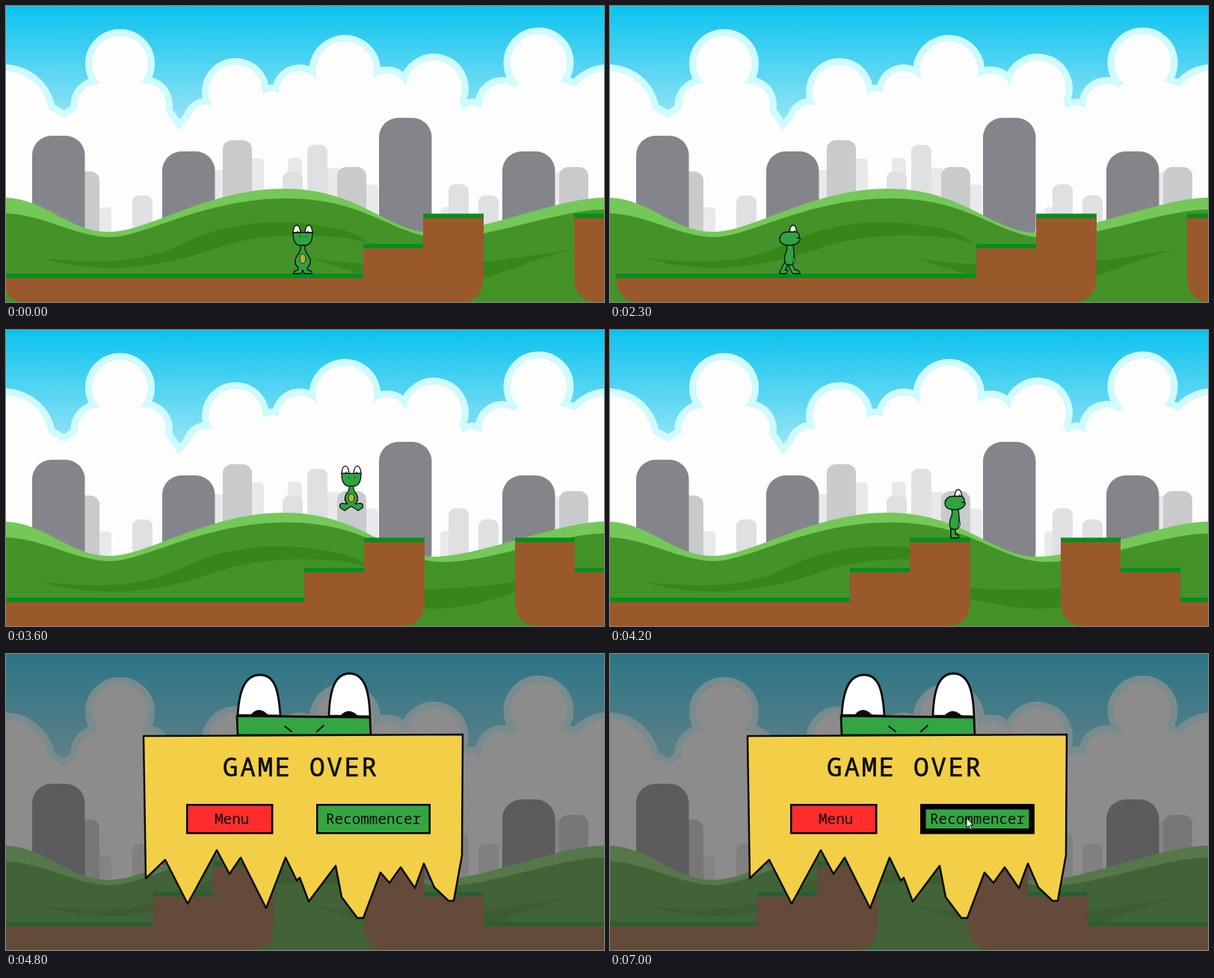
An HTML page that plays this animation: 800 px wide and 397 px high, repeating every 7.1 s.

```html
<!DOCTYPE html>
<html lang="fr">
<head>
<meta charset="utf-8">
<title>Frog platformer</title>
<style>
html, body { margin: 0; height: 100%; overflow: hidden; }
svg { display: block; width: 100%; height: 100%; }
text { font-family: "Noto Sans Mono", monospace; white-space: pre; }
.ink { stroke: #0b0b0b; stroke-linejoin: round; stroke-linecap: round; }
</style>
</head>
<body>
<svg viewBox="0 0 800 397" preserveAspectRatio="none">
  <defs>
    <linearGradient id="sky" x2="0" y2="1">
      <stop stop-color="#0bc3ee"/><stop offset="1" stop-color="#a5e8f6"/>
    </linearGradient>
    <g id="face">
      <path fill="#fff" d="M-13 -55Q-12 -65 -8 -65T-3 -55zM13 -55Q12 -65 8 -65T3 -55z"/>
      <path d="M-7 -57v2M7 -57v2"/>
      <path d="M-13 -55H13Q13 -39 4 -38H-4Q-13 -39 -13 -55z"/>
      <path d="M-3.500 -50v.4M4.500 -50v.4"/>
    </g>
    <path id="leg" d="M-3 -18L-3 -4Q-4 0 0 0H7Q9 -5 3 -5L3 -18z"/>
  </defs>

  <rect width="800" height="170" fill="url(#sky)"/>
  <path fill="#fdfdfe" stroke="#cffaff" stroke-width="18" paint-order="stroke" d="M-20 330V90
    A60 60 0 0 1 57 138L78 150L96 138A29 29 0 0 1 126 104A37.500 37.500 0 1 1 179 104A29 29 0 0 1 213 140
    L231 167L246 150A24 24 0 0 1 276 133A36 36 0 1 1 343 118A28 28 0 0 1 365 116A28 28 0 0 1 417 101
    A39 39 0 1 1 491 97A28 28 0 0 1 535 107A37.500 37.500 0 1 1 606 127L611 138A20 20 0 0 1 637 138
    A28 28 0 0 1 680 109L687 104A38 38 0 1 1 741 101L762 108A60 60 0 0 1 820 88V330z"/>
  <g id="city"></g>
  <path fill="#74c858" d="M0 257C55 260 85 303 138 303S270 245 372 245S510 304 572 304S740 257 800 257V397H0z"/>
  <path fill="#439328" d="M0 278C50 280 95 310 140 310S265 258 375 258S520 311 585 311S740 273 800 273V397H0z"/>
  <g fill="#36861a">
    <path d="M48 338C150 350 200 337 240 317S340 285 400 292S470 306 486 318C430 302 340 305 290 322S150 368 48 338z"/>
    <path d="M410 338C500 352 600 355 762 325C700 340 660 365 600 372S470 360 410 338z"/>
  </g>

  <g id="ground">
    <g fill="#9a592b">
      <path d="M-4 360H478V320H558V279H639V362Q639 397 608 397H27Q-4 397 -4 362z"/>
      <path d="M760 279H840V320H920V360H1300V397H791Q760 397 760 362z"/>
    </g>
    <path stroke="#078d20" stroke-width="6" d="M-4 362H478M478 322H558M558 281.500H639M760 281.500H840M840 322H920M920 362H1300"/>
  </g>

  <g id="frog" class="ink" fill="#2fa340" stroke-width="1.300">
    <g id="idle">
      <path d="M-3 -38Q-2 -30 -7 -25Q-14 -15 -6 -8Q-5 -5 -9 -4Q-13 -3 -12 0H-2L0 -5L2 0H12Q13 -3 9 -4Q5 -5 6 -8Q14 -15 7 -25Q2 -30 3 -38z"/>
      <ellipse cy="-20" rx="4" ry="6.500" fill="#b9b334" stroke-width=".8"/>
      <use href="#face"/>
    </g>
    <g id="leap">
      <path d="M-3 -34Q-2 -28 -7 -23Q-11 -15 -5 -10L-12 -11Q-17 -10 -15 -5L-9 -1L0 -7L9 -1L15 -5Q17 -10 12 -11L5 -10Q11 -15 7 -23Q2 -28 3 -34z"/>
      <ellipse cy="-18" rx="4" ry="5.500" fill="#b9b334" stroke-width=".8"/>
      <use href="#face" y="4"/>
    </g>
    <g id="walk">
      <use href="#leg" id="legA"/>
      <use href="#leg" id="legB"/>
      <path d="M-5 -39Q-3 -32 -7 -25Q-9 -13 -4 -12Q5 -10 6 -19Q5 -28 4 -39z"/>
      <path fill="#d8c98a" stroke-width=".7" d="M5 -24Q8 -17 4 -13z"/>
      <path fill="#fff" d="M-1 -56Q0 -65 4 -65T9 -55z"/>
      <path d="M6 -58v1.500"/>
      <path d="M-14 -47Q-13 -56 -2 -56H9Q13 -53 12 -49Q15 -46 11 -42Q8 -38 -3 -38Q-14 -39 -14 -47z"/>
      <path fill="none" d="M12 -48Q10 -47 9 -48"/>
    </g>
  </g>

  <g id="over">
    <rect width="800" height="397" fill="#424242" opacity=".6"/>
    <g class="ink" stroke-width="2.800">
      <path fill="#33a642" d="M309 83L487 85L488 109H310z"/>
      <path fill="#fff" d="M310 82C312 48 320 28 340 28C360 28 365 50 367 83zM432 83C433 48 440 26 460 26C481 27 486 52 487 84z"/>
      <path fill="#0b0b0b" stroke="none" d="M327 82Q338 68 351 82zM447 83Q458 70 471 83z"/>
      <path stroke-width="2" d="M373 97L382 104M425 96L416 104"/>
      <path fill="#f2cf47" stroke-width="2.500" d="M184 110L611 108L610 270L599 331L592 331L573 313L559 281L547 314L528 286L513 307L501 293L478 354L470 354L449 326L441 284L405 332L393 300L389 304L374 273L348 341L314 273L299 295L282 263L243 335L213 276L187 301z"/>
    </g>
    <path d="M241 201H357.500V241.500H241zM415 201H568V241.500H415z"/>
    <path fill="#ff2c2c" d="M243.500 203.500H355V239H243.500z"/>
    <path id="button" fill="#33a642"/>
    <g fill="#0b0b0b">
      <text x="290" y="164" font-size="34.500" letter-spacing="2.500" stroke="#0b0b0b" stroke-width=".5">GAME OVER</text>
      <g font-size="19.300"><text x="279" y="228">Menu</text><text x="428" y="228">Recommencer</text></g>
    </g>
    <path id="cursor" fill="#fff" stroke="#000" d="M0 0V13L3 10.500L5.500 15.500L7.500 14.500L5 9.500H9z"/>
  </g>
</svg>
<script>
const LOOP = 7100, SPEED = 0.24, GRAVITY = 2050, JUMP_SPEED = 740;
const JUMP = 3108, LAND = 3698, FALL = 4329, GAME_OVER = 4800;
const START = 125, TURN_LEFT = 396, TURN_RIGHT = 1834, REST = 3800, RESUME = 4075, WALL = 4717;
const $ = id => document.getElementById(id);
const show = (id, on) => $(id).setAttribute('display', on ? 'inline' : 'none');
const move = (id, value) => $(id).setAttribute('transform', value);
const clamp = (v, lo, hi) => Math.min(hi, Math.max(lo, v));

function tower(color, width, radius, x, y) {
  $('city').innerHTML +=
    `<rect x="${x}" y="${y}" width="${width}" height="${325 - y}" rx="${radius}" fill="${color}"/>`;
}
// Far skyline rises and falls as a wave; nearer towers stand at chosen spots.
for (let x = 122; x < 780; x += 51) tower('#e9e9eb', 19, 5, x, 236 - 34 * Math.cos((x - 355) / 74));
for (const [x, y] of [[169, 254], [370, 222], [403, 186], [592, 239], [632, 254]]) tower('#dfe0e2', 27, 9, x, y);
for (const [x, y] of [[86, 222], [290, 180], [443, 216], [740, 216]]) tower('#c9cacc', 39, 12, x, y);
for (const [x, y] of [[35, 174], [209, 195], [499, 150], [664, 195]]) tower('#84858a', 70.5, 26, x, y);

// Walking time spent between two moments
const spent = (t, from, to) => clamp(t, from, to) - from;

const worldX = t => 397 + SPEED * (spent(t, START, TURN_LEFT) - spent(t, TURN_LEFT, TURN_RIGHT)
  + spent(t, TURN_RIGHT, REST) + spent(t, RESUME, WALL));

function feetY(t) {
  if (t < JUMP) return 359;
  if (t < LAND) {
    const s = (t - JUMP) / 1000;
    return 359 - JUMP_SPEED * s + GRAVITY / 2 * s * s;
  }
  const s = Math.max(0, t - FALL) / 1000;
  return 279 + GRAVITY / 2 * s * s;
}

function drawFrog(t) {
  const x = worldX(t);
  const dir = Math.sign(worldX(t + 1) - x);
  const camera = t < TURN_RIGHT ? Math.max(0, 129 - x) : Math.min(12, 462 - x);
  move('ground', `translate(${camera})`);
  move('frog', `translate(${x + camera} ${feetY(t)}) scale(${dir || 1} 1)`);

  const leaping = t >= JUMP && t < LAND;
  show('leap', leaping);
  show('idle', !leaping && !dir);
  show('walk', !leaping && dir);
  const swing = 27 * Math.sin(t / 200 * Math.PI);
  const leg = angle => `translate(-3 -18) skewX(${angle}) translate(0 18)`;
  move('legA', leg(swing));
  move('legB', leg(-swing));
}

function drawGameOver(t) {
  show('over', t >= GAME_OVER);
  const left = (1 - clamp((t - 5850) / 750, 0, 1)) ** 2;
  const x = 477 + 90 * left, y = 220 + 182 * left;
  move('cursor', `translate(${x} ${y})`);
  const border = y < 241 ? 7.5 : 2.5;
  $('button').setAttribute('d',
    `M${415 + border} ${201 + border}H${568 - border}V${241.5 - border}H${415 + border}z`);
}

function draw() {
  const t = performance.now() % LOOP;
  drawFrog(t);
  drawGameOver(t);
  requestAnimationFrame(draw);
}
draw();
</script>
</body>
</html>
```
